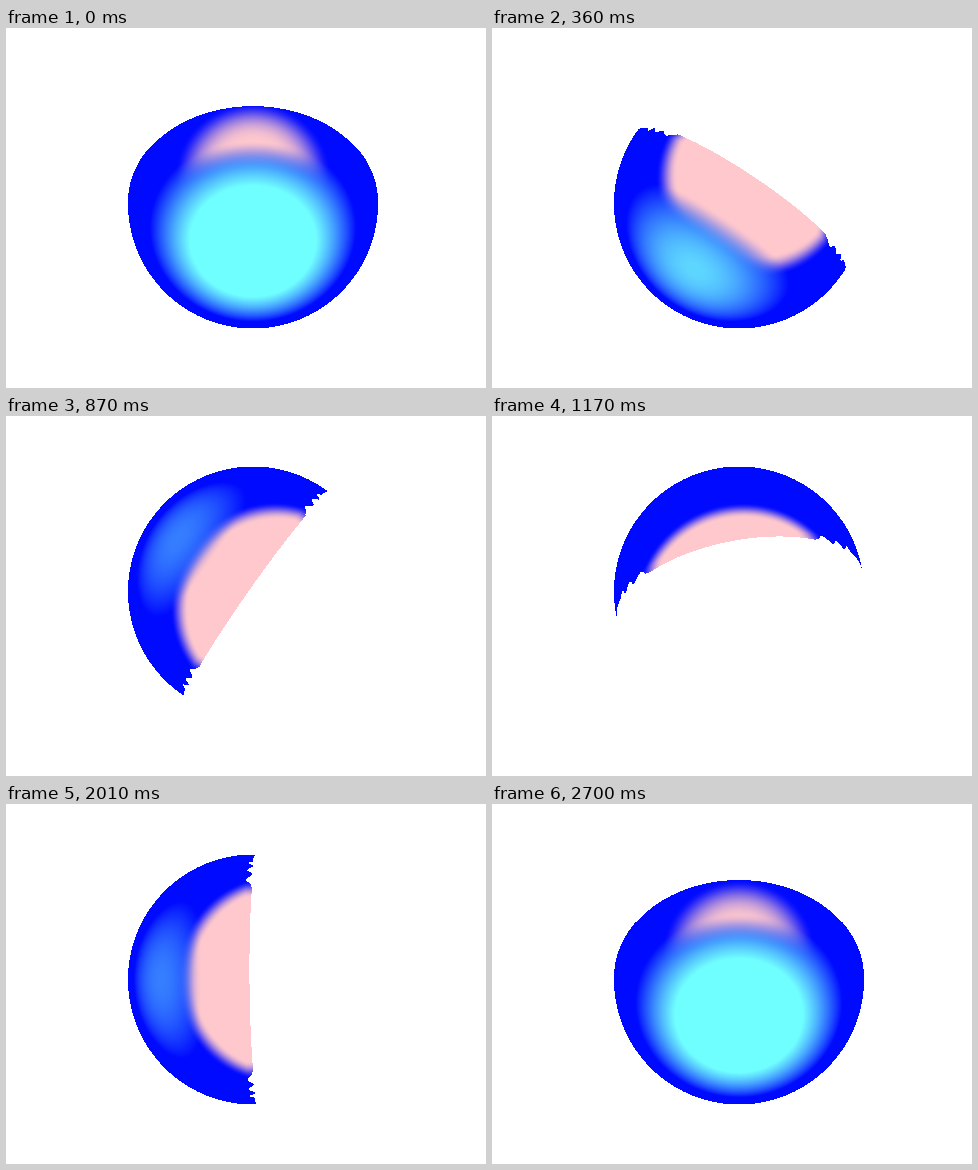
An HTML page with a canvas for the animation above (2.73 s loop, 480x360 px).

```html
<!DOCTYPE html>
<html lang="en">
<head>
<meta charset="utf-8">
<title>Lit sphere</title>
<style>
  html, body { margin: 0; width: 100%; height: 100%; overflow: hidden; background: #fff; }
  canvas { display: block; width: 480px; height: 360px; }
</style>
</head>
<body>
<canvas id="stage" width="480" height="360"></canvas>
<script>
const W = 480, H = 360, CX = 247, CY = 175.5, R = 125;
const STEP = 30, COUNT = 91, TURN = 90.4;
const TILT = 40 * Math.PI / 180;
const BLUE = [0, 10, 255], CYAN = [112, 255, 255], PINK = [255, 200, 205];

const ctx = document.getElementById('stage').getContext('2d');
const img = ctx.createImageData(W, H);
const px = img.data;

const clamp = v => Math.max(0, Math.min(1, v));
const ramp = (a, b, v) => clamp((v - a) / (b - a));
const smooth = (a, b, v) => { const k = ramp(a, b, v); return k * k * (3 - 2 * k); };

// Unit normals of the visible half of the sphere
const points = [];
for (let y = 0; y < H; y++) {
  for (let x = 0; x < W; x++) {
    const nx = (x + 0.5 - CX) / R, ny = (y + 0.5 - CY) / R;
    const d = nx * nx + ny * ny;
    if (d <= 1) points.push({ i: (y * W + x) * 4, nx, ny, nz: Math.sqrt(1 - d) });
  }
}

// The light travels on a tilted Viviani curve
function lightAt(u) {
  const s = Math.sin(u), c = Math.cos(u);
  const p = s * c, q = c;
  return {
    x: -s * s,
    y: p * Math.cos(TILT) + q * Math.sin(TILT),
    z: q * Math.cos(TILT) - p * Math.sin(TILT)
  };
}

// Lowest light value that is still painted; ragged towards the rim
function cutoff(facing, rough) {
  if (facing > 0.67) return -0.05;
  if (facing < 0.33) return -0.03;
  return -0.02 - 0.022 * rough * Math.cos(2 * Math.PI * (facing - 0.54) / 0.12);
}

function draw(frame) {
  const l = lightAt(2 * Math.PI * frame / TURN);
  const rough = clamp(1 - 1.4 * l.z);
  px.fill(255);
  for (const { i, nx, ny, nz } of points) {
    const lit = nx * l.x + ny * l.y + nz * l.z;
    if (lit < cutoff(nz, rough)) continue;
    const cyan = ramp(0.28, 0.66, lit * nz);
    const edge = nz - 0.70 - 0.32 * Math.max(0, lit);
    const pink = smooth(-0.09, 0.06, edge) * (1 - smooth(0.34, 0.56, lit));
    for (let k = 0; k < 3; k++) {
      const base = BLUE[k] + (CYAN[k] - BLUE[k]) * cyan;
      px[i + k] = base + (PINK[k] - base) * pink;
    }
  }
  ctx.putImageData(img, 0, 0);
}

const start = performance.now();
let last = -1;
function tick() {
  const frame = Math.floor((performance.now() - start) / STEP) % COUNT;
  if (frame !== last) draw(last = frame);
  requestAnimationFrame(tick);
}
tick();
</script>
</body>
</html>
```
